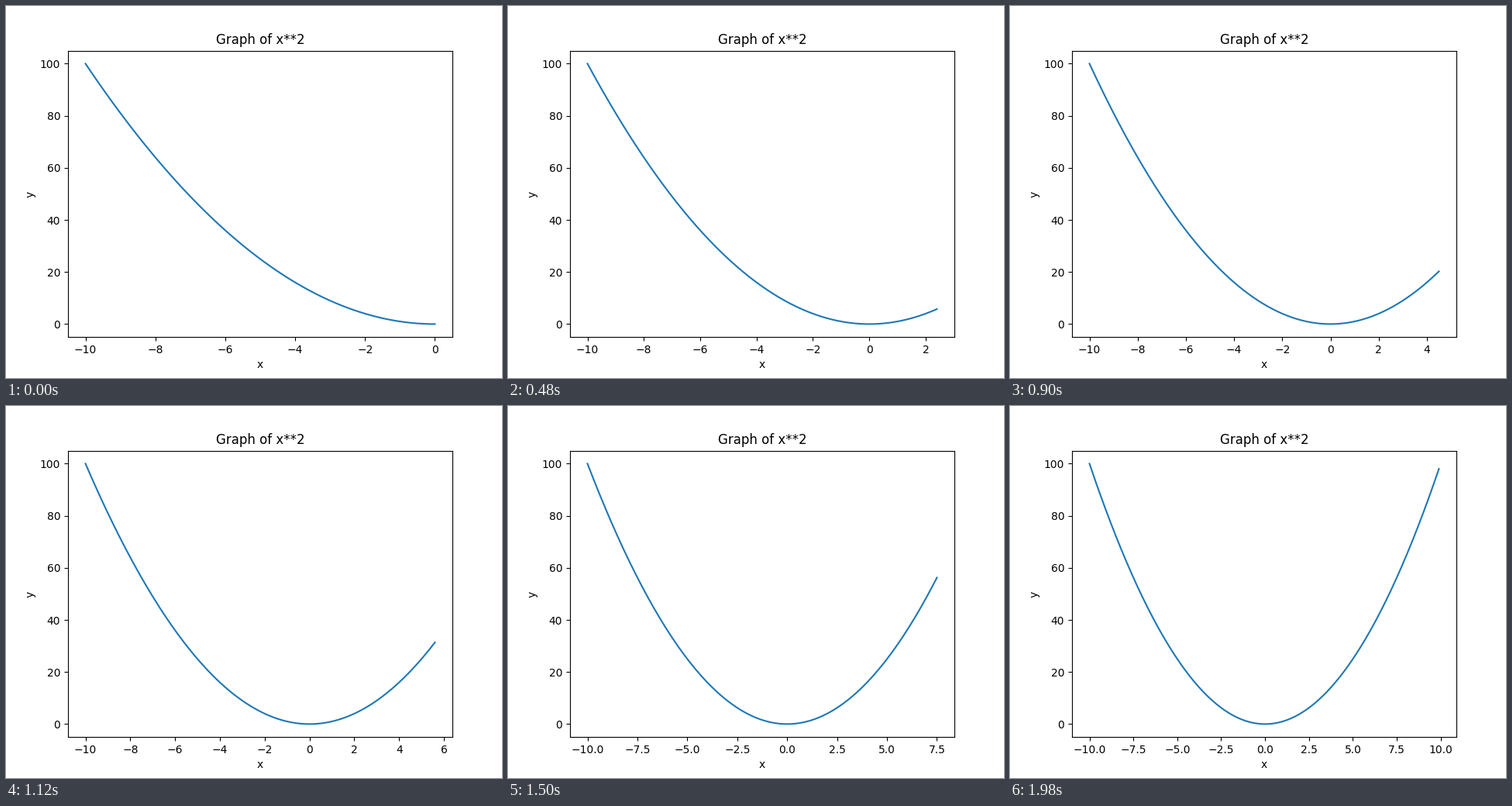
Animation, 640 px wide and 480 px high, one loop 2 s. Source, as a matplotlib script:

```python
import numpy as np
import matplotlib.pyplot as plt
from matplotlib.animation import FuncAnimation

FRAMES = 100
INTERVAL = 20  # ms
START = -10
STEP = 0.1

fig, ax = plt.subplots(figsize=(6.4, 4.8), dpi=100)
ax.set(title="Graph of x**2", xlabel="x", ylabel="y")
line, = ax.plot([], [], color="tab:blue", lw=1.5)


def update(i):
    """Extend the parabola to x = i * STEP and refit the axes around it."""
    x = np.linspace(START, i * STEP, FRAMES + i + 1)
    line.set_data(x, x**2)
    ax.relim()
    ax.autoscale_view()
    return line,


def init():
    return update(0)


anim = FuncAnimation(fig, update, frames=FRAMES, init_func=init,
                     interval=INTERVAL, repeat=True, repeat_delay=0, blit=False)

plt.show()
```
